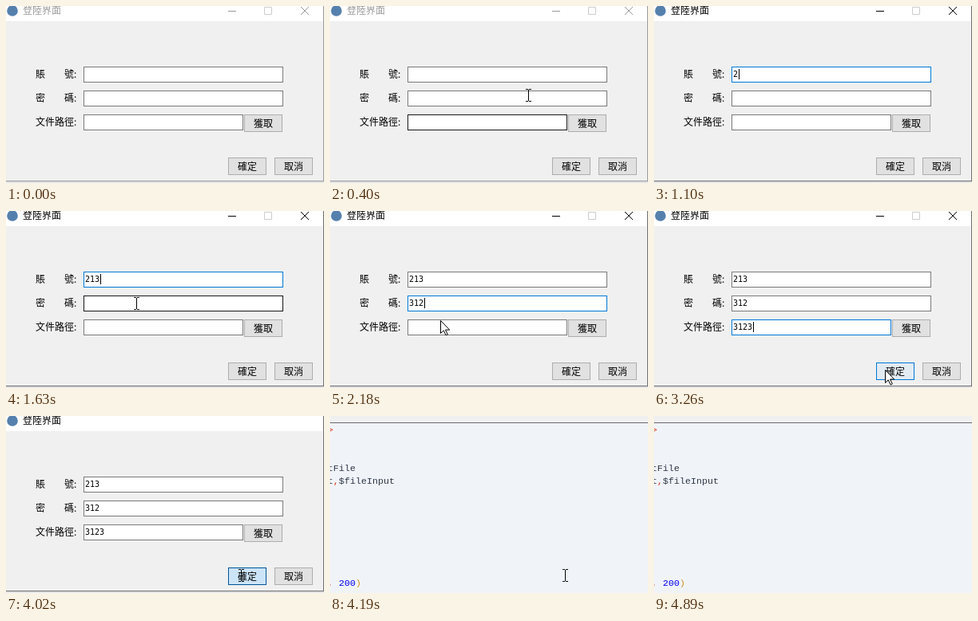
Recreate the animation shown at these times as an HTML page. Size 398 by 222 pixels, loop 5.44 s.

```html
<!DOCTYPE html>
<html lang="zh-Hant">
<head>
<meta charset="utf-8">
<title>登陸界面</title>
<style>
  html, body { margin: 0; width: 100%; height: 100%; overflow: hidden; background: #f0f0f0; }
  svg { display: block; width: 398px; height: 222px; }
  text { font: 12px "Noto Sans CJK TC", "Noto Sans CJK SC", "Noto Sans CJK JP", sans-serif; white-space: pre; }
  rect { shape-rendering: crispEdges; }
  .digits { font: 10px "DejaVu Sans Mono", monospace; }
  .code text { font: 11.667px "Liberation Mono", "Courier New", monospace; fill: #303848; }
  .code .op { fill: #e03010; }
  .code .num { fill: #0000f0; }
  .code .paren { fill: #d09020; }
</style>
</head>
<body>
<svg id="stage" viewBox="0 0 398 222">
  <g id="editor" class="code">
    <rect width="398" height="222" fill="#f0f4f9"/>
    <rect width="398" height="8" fill="#f0f0f0"/>
    <rect y="8" width="398" height="1" fill="#696969"/>
    <text class="op" x="-3" y="21">&gt;</text>
    <text x="-3" y="69">tFile</text>
    <text x="-3" y="85">t<tspan class="op">,</tspan>$fileInput</text>
    <text x="-3" y="213"><tspan class="op">,</tspan> <tspan class="num">200</tspan><tspan class="paren">)</tspan></text>
  </g>
  <g id="dialog">
    <rect width="398" height="222" fill="#dfe1e4"/>
    <rect id="frame" width="398" height="220"/>
    <rect width="397" height="219" fill="#f0f0f0"/>
    <rect width="397" height="19" fill="#fff"/>
    <circle cx="8" cy="6" r="6.8" fill="#5580ad"/>
    <text id="caption" x="21" y="10">登陸界面</text>
    <g id="controls" fill="none">
      <path d="M278 6.5h10"/>
      <path d="M323.5 1.5h9v9h-9z" style="stroke:#ccc"/>
      <path d="M369 1l10 10M379 1l-10 10"/>
    </g>
    <text x="37" y="90">賬　　號:</text>
    <text x="37" y="120">密　　碼:</text>
    <text x="37" y="150">文件路徑:</text>
    <g id="widgets"></g>
  </g>
  <g id="pointer">
    <path id="arrow" d="M.5.5v16l3.7-3.6 2.9 6 2.2-1-2.8-5.8h5.2z" fill="#fff" stroke="#000"/>
    <path id="beam" d="M-3.5-7.5h3m1 0h3M0-7V7M-3.5 7.5h3m1 0h3" fill="none" stroke="#000"/>
  </g>
</svg>
<script>
const LOOP = 5440, TICK = 77, START = 100;
const ACTIVE = 720, PRESS = 3720, CLOSING = 4020, CLOSED = 4100;
const $ = id => document.getElementById(id);

const fields = [
  { x: 97, y: 76, w: 250, text: "213", focus: [ACTIVE, 1710], keys: [1100, 1250, 1330] },
  { x: 97, y: 106, w: 250, text: "312", focus: [1710, 2490], keys: [1950, 2030, 2100] },
  { x: 97, y: 136, w: 200, text: "3123", focus: [2490, PRESS], keys: [2640, 2720, 2800, 2870] }
];
const buttons = [
  { x: 298, y: 136, label: "獲取" },
  { x: 278, y: 190, label: "確定" },
  { x: 336, y: 190, label: "取消" }
];
// Pointer waypoints: time, x, y
const path = [
  [100, 262, 218], [250, 254, 170], [331, 251, 146], [408, 249, 112],
  [640, 243, 87], [790, 243, 87], [940, 215, 114], [1480, 215, 114],
  [1700, 145, 117], [2030, 140, 118], [2179, 138, 137], [2410, 146, 146],
  [2870, 150, 147], [2950, 205, 164], [3030, 245, 177], [3180, 284, 194],
  [3257, 289, 199], [4010, 289, 199], [4020, 295, 200], [4649, 295, 200],
  [4650, 294, 200], [4819, 294, 200], [4820, 293, 214]
];
const visible = [[100, 1100], [1480, 1880], [2180, 2570], [2950, 4890]];

function add(tag, attrs) {
  const node = document.createElementNS("http://www.w3.org/2000/svg", tag);
  for (const name in attrs) node.setAttribute(name, attrs[name]);
  return $("widgets").appendChild(node);
}
const box = (x, y, w, h) =>
  add("rect", { x: x + .5, y: y + .5, width: w - 1, height: h - 1 });

for (const f of fields) {
  f.h = 20;
  f.rect = box(f.x, f.y, f.w, f.h);
  f.rect.setAttribute("fill", "#fff");
  f.value = add("text", { x: 99, y: f.y + 13, class: "digits" });
  f.caret = add("rect", { y: f.y + 3, width: 1, height: 13 });
}
for (const b of buttons) {
  b.w = 48;
  b.h = 22;
  b.rect = box(b.x, b.y, b.w, b.h);
  add("text", { x: b.x + 24, y: b.y + 16, "text-anchor": "middle" }).textContent = b.label;
}

const within = (t, [from, to]) => t >= from && t < to;
const show = (node, on) => node.setAttribute("visibility", on ? "inherit" : "hidden");
const paint = (node, stroke, fill) => {
  node.style.stroke = stroke;
  if (fill) node.style.fill = fill;
};

function pointAt(t) {
  const i = path.findIndex(p => p[0] > t);
  if (i <= 0) return (i ? path[path.length - 1] : path[0]).slice(1);
  const [t0, x0, y0] = path[i - 1], [t1, x1, y1] = path[i];
  const k = (t - t0) / (t1 - t0);
  return [Math.round(x0 + (x1 - x0) * k), Math.round(y0 + (y1 - y0) * k)];
}
const hit = ([x, y], w) => x >= w.x && x < w.x + w.w && y >= w.y && y < w.y + w.h;

function drawField(f, t, hovered) {
  const focused = within(t, f.focus);
  const typed = f.keys.filter(k => k <= t);
  const since = t - Math.max(f.focus[0], ...typed);
  paint(f.rect, focused ? "#0078d7" : hovered ? "#171717" : "#7a7a7a");
  f.value.textContent = f.text.slice(0, typed.length);
  f.caret.setAttribute("x", 100 + 6 * typed.length);
  show(f.caret, focused && since % 1060 < 530);
}

function drawButton(b, t, hovered) {
  if (b === buttons[1] && t >= PRESS) paint(b.rect, "#005499", "#cce4f7");
  else if (hovered) paint(b.rect, "#0078d7", t < 3330 ? "#e3ebf2" : "#e5f1fb");
  else paint(b.rect, "#adadad", "#e1e1e1");
}

function render(t) {
  const active = t >= ACTIVE;
  // The screen is sampled in ticks; hover and cursor shape lag one tick behind.
  const now = t < 4190 ? START + TICK * Math.floor((t - START + 12) / TICK) : t;
  const seen = visible.some(span => within(t, span));
  const last = pointAt(now - TICK);
  const over = w => seen && now > START && hit(last, w);

  show($("dialog"), t < CLOSED);
  show($("editor"), t >= CLOSED);
  $("frame").style.fill = active ? "#707070" : "#9a9a9a";
  $("caption").style.fill = active ? "#000" : "#999";
  $("controls").style.stroke = active ? "#000" : "#999";
  show($("controls"), t < CLOSING);
  fields.forEach(f => drawField(f, t, over(f)));
  buttons.forEach(b => drawButton(b, t, over(b)));

  const [x, y] = pointAt(now);
  const beam = t >= CLOSING || fields.some(over);
  $("pointer").setAttribute("transform", `translate(${beam ? x - .5 : x} ${y})`);
  show($("pointer"), seen);
  show($("beam"), seen && beam);
  show($("arrow"), seen && !beam);
}

const begin = performance.now();
function frame() {
  render((performance.now() - begin) % LOOP);
  requestAnimationFrame(frame);
}
frame();
</script>
</body>
</html>
```
